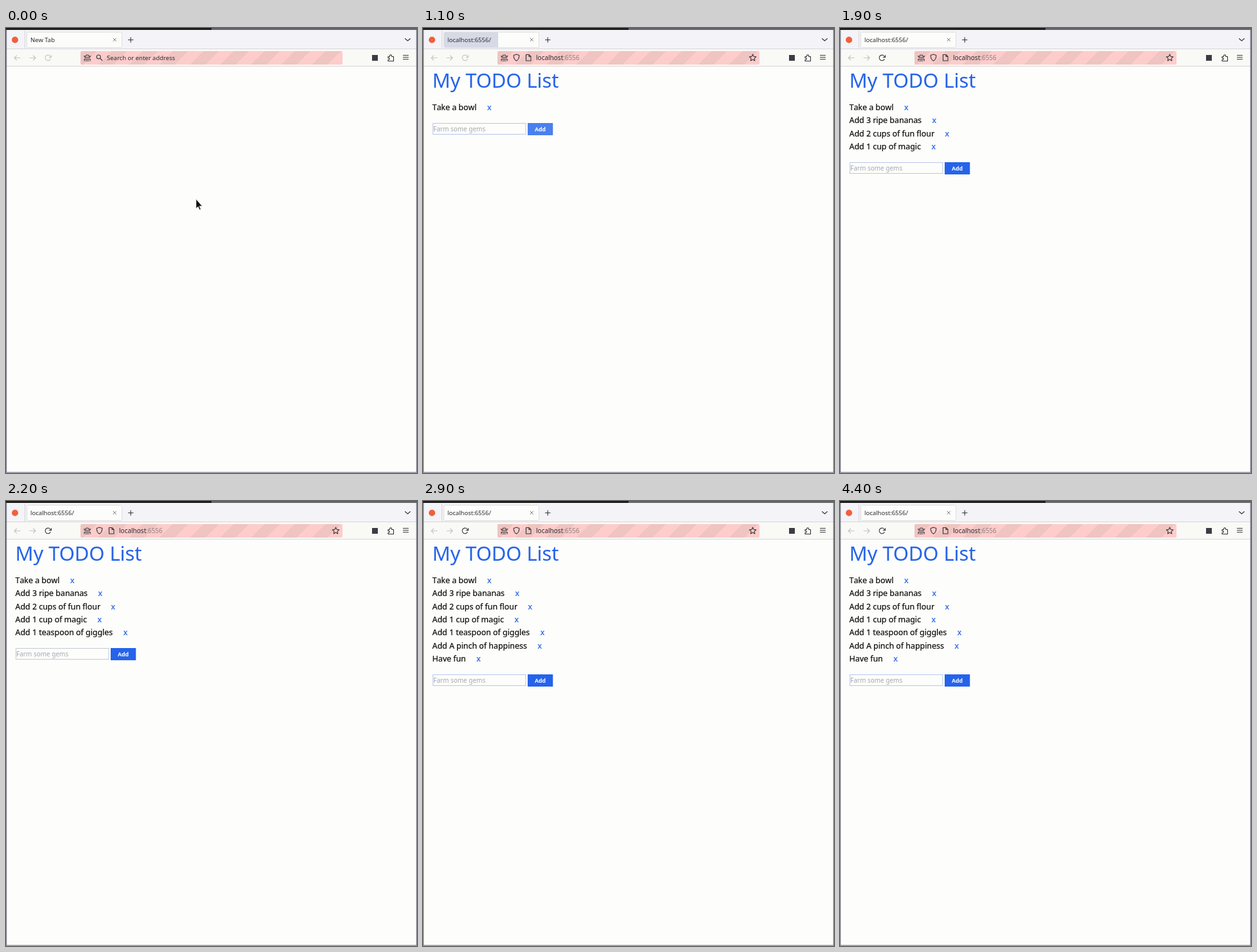
An HTML page that plays this animation: 640x693 px, repeating every 4.5 s.

```html
<!DOCTYPE html>
<html lang="en">
<head>
<meta charset="utf-8">
<title>Todo list in a browser</title>
<style>
  html, body { margin: 0; width: 100%; height: 100%; overflow: hidden; background: #fdfdfb; }
  #address {
    position: absolute; left: 116px; top: 36px; width: 408px; height: 21px; border-radius: 2px;
    background: repeating-linear-gradient(-45deg, #fdcccb 0 16.8px, #efc4c1 16.8px 33.6px);
  }
  svg {
    position: absolute; left: 0; top: 0; display: block; width: 100%; height: 100%;
    font-family: "Noto Sans", sans-serif;
  }
  .line { fill: none; stroke: #35353b; stroke-width: 1.1; stroke-linecap: round; stroke-linejoin: round; }
  .thin { stroke: #66666c; stroke-width: .9; }
  .off { stroke: #c4c4c8; }
  .ui { font-size: 9.5px; fill: #2b2b31; }
  .item { font-size: 12.4px; font-kerning: none; fill: #0a0a0a; stroke: #0a0a0a; stroke-width: .2; }
  .link { fill: #2563eb; stroke: #2563eb; }
</style>
</head>
<body>
<svg viewBox="0 0 640 693">
  <path fill="#f3f3f8" d="M0 0H640V33H0z"/>
  <path fill="#f9f9f6" d="M0 32H640V60H0z"/>
  <path fill="#1c1c1c" d="M0 0H320V3H0z"/>
  <path fill="#65656a" d="M320 0H640V3H320z"/>
  <path stroke="#d6d6da" d="M0 32.5H640M0 59.5H640M29.5 4V32"/>
  <rect x="32.5" y="6.5" width="148" height="24" rx="2" fill="#fcfcfa" stroke="#dedede"/>
</svg>
<div id="address"></div>
<svg viewBox="0 0 640 693">
  <rect id="burst" x="33" y="7" height="23" fill="#d6dae6"/>
  <circle cx="14" cy="18.5" r="5" fill="#f0603a"/>
  <circle id="dot" cy="18.5" r="1" fill="#55555c"/>
  <text id="tab" class="ui" y="22"/>
  <g class="line">
    <path class="thin" d="M167 16l4.500 4.500m0-4.500l-4.500 4.500"/>
    <path d="M190.500 18.500h7.500m-3.750-3.750v7.500M621.500 16.500l4 3.500 4-3.500"/>
    <path class="off" d="M22 46.500h-9m3.500-3.500l-3.500 3.500 3.500 3.500M37 46.500h9m-3.500-3.500l3.500 3.500-3.500 3.500"/>
    <path id="reload" d="M69.500 45a4.300 4.300 0 1 0-.3 3.500M70.500 42.500v3.300h-3.300"/>
    <path d="M618.500 42.500h8m-8 3h8m-8 3h8"/>
    <path d="M595 44.500h2.500v-1a1.600 1.600 0 0 1 3.200 0v1h2.800v7h-8.500v-2.300h1a1.300 1.300 0 0 0 0-2.600h-1z"/>
    <path d="M123 46a3.600 4 0 0 1 7.200 0zM122 51v-2.500h9.200v2.500m-7.200 0h5.200M121.500 43.500l1 1.500m9.200-1.500l-1 1.500M125 44h.1m3 0h.1"/>
    <path id="search" d="M147.200 45a3 3 0 1 1-6 0 3 3 0 0 1 6 0m-.8 2.200l3.300 3.300"/>
    <g id="site">
      <path d="M145.500 41l4.300 1.500c0 4-1.300 7-4.300 8.800-3-1.800-4.300-4.800-4.300-8.800z"/>
      <path d="M160.500 41.500h4.500l3 3v6.500h-7.500zM165 41.500v3h3"/>
      <path id="star"/>
    </g>
  </g>
  <path fill="#3c3c42" d="M570 42h9v9h-9z"/>
  <text id="hint" class="ui" x="157" y="50">Search or enter address</text>
  <text id="url" class="ui" x="176" y="50" style="font-size:10px">localhost<tspan fill="#937f80">:6556</tspan></text>

  <g id="page">
    <text x="14.500" y="93" font-size="31" letter-spacing="-.1" fill="#2563eb">My TODO List</text>
    <g id="list"></g>
    <g id="form">
      <rect id="ring" x="14" y="147" width="147" height="19" fill="#fdfdfb" stroke="#3b78dd" stroke-width="2"/>
      <rect id="field" x="15.500" y="148.500" width="144.500" height="17" fill="#fdfdfb"/>
      <text id="value" x="16" y="160.500" font-size="10"/>
      <path id="caret" stroke="#0a0a0a" d="M0 151v11"/>
      <rect id="button" x="163" y="148" width="39.300" height="19"/>
      <text x="182.600" y="160.500" font-size="8.800" font-weight="700" text-anchor="middle" fill="#fff">Add</text>
    </g>
  </g>

  <g id="status">
    <path fill="#f9f9f6" stroke="#d8d8d4" d="M1.500 676.500h43a2 2 0 0 1 2 2v13h-45z"/>
    <text class="ui" x="3.700" y="687.500">localhost</text>
  </g>
  <path id="mouse" fill="#0c0c0c" stroke="#f0f0ee" stroke-width=".7" d="M296 266.500v14.500l3.200-2.800 2.200 5 2-.9-2.200-4.900h4.300z"/>
  <path fill="none" stroke="#777b88" stroke-width="1.200" d="M.6 3V692.200H639.400V3"/>
</svg>
<script>
const LOOP = 4500, ROW = 20.35;
const $ = id => document.getElementById(id);
const items = ["Take a bowl", "Add 3 ripe bananas", "Add 2 cups of fun flour", "Add 1 cup of magic",
  "Add 1 teaspoon of giggles", "Add A pinch of happiness", "Have fun"];

// Each step keeps the values before it and overrides some of them.
const steps = [
  [0, { mouse: true, count: 0, typed: false, dot: 0, burst: 0, reload: false, loading: false, border: "#b9c6e8", button: "#2563eb" }],
  [300, { mouse: false }],
  [800, { loading: true, reload: true, dot: 38 }],
  [900, { dot: 43 }],
  [1000, { dot: 48 }],
  [1100, { loading: false, reload: false, dot: 0, count: 1, burst: 84, button: "#4a80ee" }],
  [1200, { burst: 147, button: "#2563eb" }],
  [1300, { burst: 0, typed: true }],
  [1400, { count: 2, typed: false }],
  [1600, { typed: true }],
  [1700, { count: 3, typed: false }],
  [1800, { typed: true, reload: true }],
  [1900, { count: 4, typed: false }],
  [2000, { typed: true }],
  [2100, { count: 5, typed: false }],
  [2200, { border: "#c4c8d2" }],
  [2300, { typed: true }],
  [2400, { count: 6, typed: false }],
  [2600, { typed: true }],
  [2700, { count: 7, typed: false, border: "#b5c8f5" }]
];
let state = {};
const timeline = steps.map(([time, change]) => ({ time, state: state = { ...state, ...change } }));

function show(id, on) { $(id).style.display = on ? "" : "none"; }
function set(id, attrs) {
  for (const name in attrs) $(id).setAttribute(name, attrs[name]);
}

const star = Array.from({ length: 10 }, (_, i) => {
  const r = i % 2 ? 2.6 : 5.5, a = i * Math.PI / 5;
  return `${513.5 + r * Math.sin(a)} ${46.5 - r * Math.cos(a)}`;
});
set("star", { d: `M${star.join("L")}z` });

const rows = items.map((label, i) => {
  const row = document.createElementNS("http://www.w3.org/2000/svg", "text");
  row.setAttribute("class", "item");
  row.setAttribute("x", 14.5);
  row.setAttribute("y", 128 + Math.round(i * ROW));
  row.innerHTML = `${label}<tspan class="link" dx="16.5">x</tspan>`;
  $("list").append(row);
  return row;
});

function draw(s) {
  const open = s.count > 0, visited = open || s.loading;
  show("mouse", s.mouse);
  show("status", s.loading);
  show("search", !visited);
  show("hint", !visited);
  show("url", visited);
  show("site", open);
  show("page", open);
  show("dot", s.dot);
  set("dot", { cx: s.dot });
  set("burst", { width: s.burst, opacity: s.burst > 100 ? 0.5 : 1 });
  set("reload", { class: s.reload ? "" : "off" });
  set("tab", { x: s.loading ? 52.5 : 38 });
  $("tab").textContent = visited ? "localhost:6556/" : "New Tab";
  if (!open) return;

  rows.forEach((row, i) => { row.style.display = i < s.count ? "" : "none"; });
  set("form", { transform: `translate(0 ${Math.round((s.count - 1) * ROW)})` });
  show("ring", s.typed);
  show("caret", s.typed);
  set("field", { stroke: s.typed ? "none" : s.border });
  set("button", { fill: s.button });
  $("value").textContent = s.typed ? items[s.count] : "Farm some gems";
  set("value", { fill: s.typed ? "#0a0a0a" : "#a4a8ae" });
  if (s.typed) {
    const end = 16 + $("value").getComputedTextLength();
    set("caret", { transform: `translate(${Math.floor(end) + 0.5} 0)` });
  }
}

let start, current;
function tick(now) {
  start ??= now;
  const time = (now - start) % LOOP;
  const step = timeline.findLast(entry => entry.time <= time);
  if (step !== current) draw((current = step).state);
  requestAnimationFrame(tick);
}
draw(timeline[0].state);
requestAnimationFrame(tick);
</script>
</body>
</html>
```
